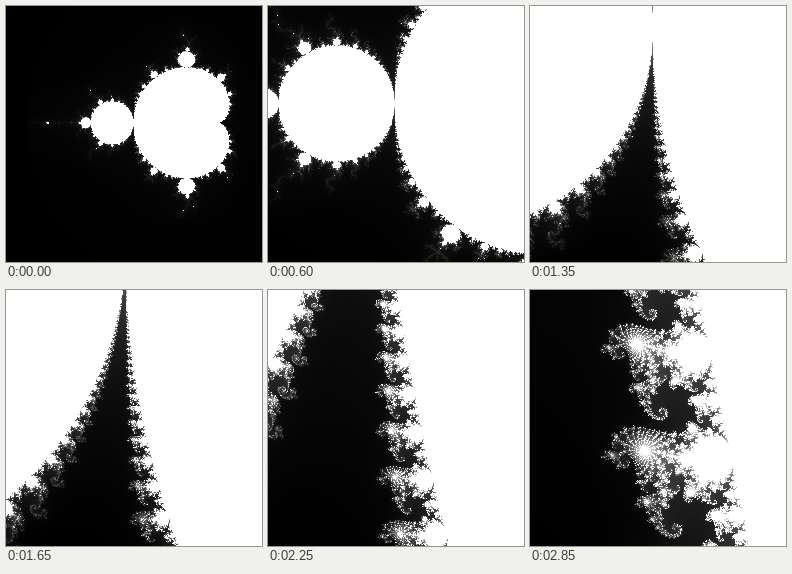
An HTML page with a canvas for the animation above (3000 ms loop, 256 by 256 pixels).

```html
<!DOCTYPE html>
<html lang="en">
<head>
<meta charset="utf-8">
<title>Mandelbrot zoom</title>
<style>
  html, body { margin: 0; width: 100%; height: 100%; overflow: hidden; background: #000; }
  canvas { display: block; width: 256px; height: 256px; }
</style>
</head>
<body>
<canvas id="view" width="256" height="256"></canvas>
<script>
const SIZE = 256;
const STEPS = 20;
const STEP_MS = 150;
const MAX_ITER = 256;
const CENTER = { re: -0.743643887037151, im: 0.13182590420533 };
const START_SPAN = 3;
const ZOOM_RATE = 0.25;

const ctx = document.getElementById('view').getContext('2d');
const cache = [];

// Main cardioid and period-2 disc need no iteration
function inMainBody(re, im) {
  const im2 = im * im;
  const q = (re - 0.25) ** 2 + im2;
  return q * (q + re - 0.25) <= im2 / 4 || (re + 1) ** 2 + im2 <= 1 / 16;
}

function escapeCount(re, im) {
  if (inMainBody(re, im)) return MAX_ITER;
  let x = 0, y = 0, x2 = 0, y2 = 0, n = 0;
  while (n < MAX_ITER && x2 + y2 <= 4) {
    y = 2 * x * y + im;
    x = x2 - y2 + re;
    x2 = x * x;
    y2 = y * y;
    n++;
  }
  return n;
}

function countGrid(step) {
  const counts = new Uint16Array(SIZE * SIZE);
  const mid = (SIZE - 1) / 2;
  const scale = START_SPAN * Math.exp(-ZOOM_RATE * step) / (SIZE - 1);
  for (let row = 0, i = 0; row < SIZE; row++) {
    const im = CENTER.im + (row - mid) * scale;
    for (let col = 0; col < SIZE; col++) {
      counts[i++] = escapeCount(CENTER.re + (col - mid) * scale, im);
    }
  }
  return counts;
}

// Greys run from the lowest count in view (black) to the set itself (white)
function render(step) {
  const counts = countGrid(step);
  const low = counts.reduce((a, b) => Math.min(a, b));
  const image = ctx.createImageData(SIZE, SIZE);
  const pixels = new Uint32Array(image.data.buffer);
  counts.forEach((n, i) => {
    const grey = Math.floor(255 * (n - low) / (MAX_ITER - low));
    pixels[i] = 0xff000000 | grey * 0x010101;
  });
  return image;
}

const start = performance.now();
let shown = -1;

function draw() {
  const step = Math.floor((performance.now() - start) / STEP_MS) % STEPS;
  if (step !== shown) {
    cache[step] = cache[step] || render(step);
    ctx.putImageData(cache[step], 0, 0);
    shown = step;
  }
  requestAnimationFrame(draw);
}
draw();
</script>
</body>
</html>
```
